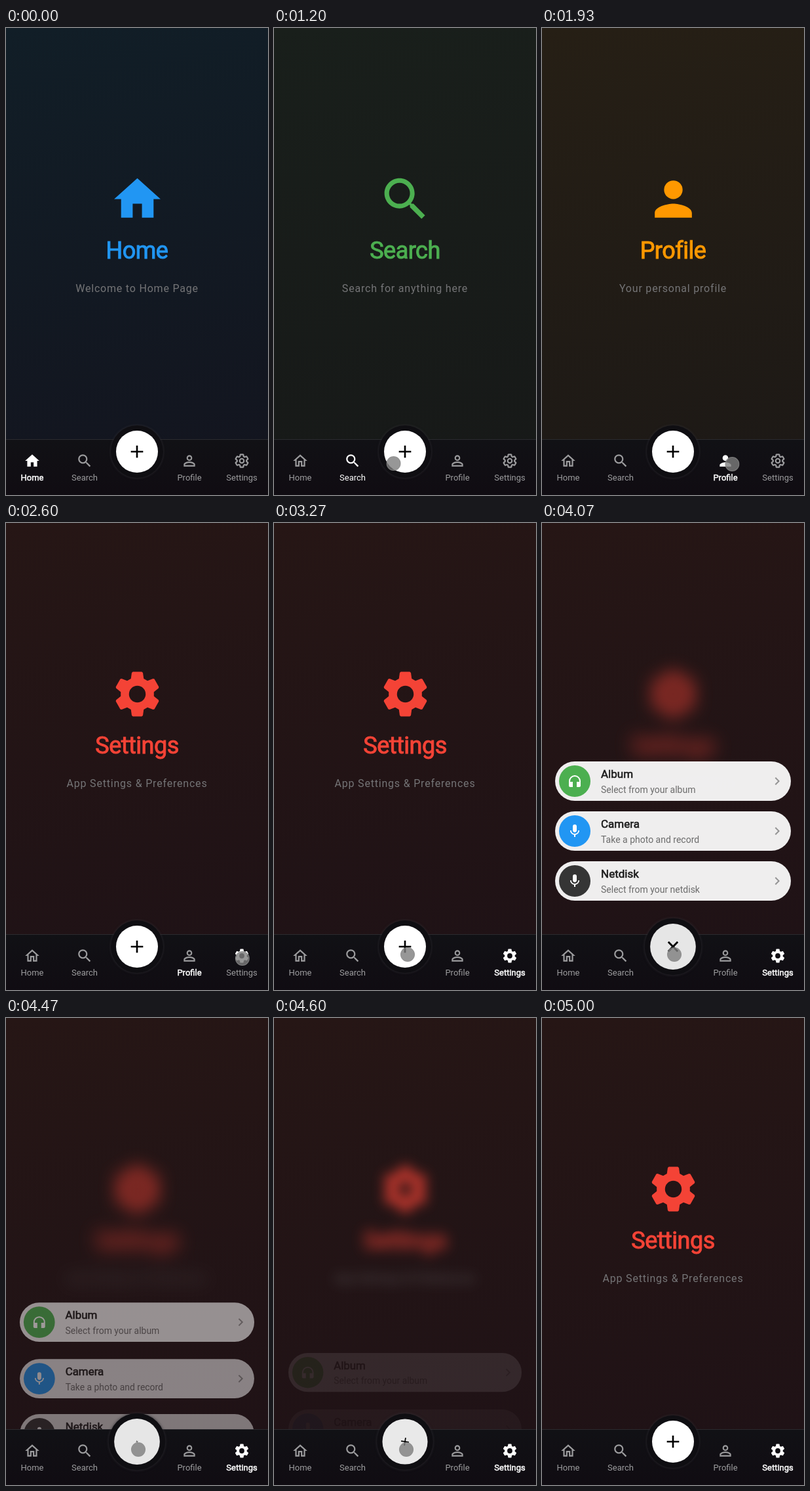
Write an HTML page that moves like this. It is 400 by 711 pixels and loops after 5.4 s.

```html
<!DOCTYPE html>
<html lang="en">
<head>
<meta charset="utf-8">
<title>Tab bar</title>
<style>
  html, body { margin: 0; width: 100%; height: 100%; overflow: hidden; background: #111; }
  #stage { position: relative; width: 400px; height: 711px; overflow: hidden; font-family: Roboto, "Open Sans", sans-serif; }
  #stage div, #stage svg { position: absolute; }
  .fill { inset: 0; }
  .line { white-space: nowrap; line-height: 20px; height: 20px; }
  .mid { left: 0; width: 100%; text-align: center; }
  .title { top: 329px; font-size: 36px; letter-spacing: -.5px; -webkit-text-stroke: 1px currentColor; }
  .sub { top: 386.5px; font-size: 16px; letter-spacing: .8px; color: #747476; }
  .card { left: 20px; width: 360px; height: 60px; border-radius: 30px; background: rgba(255,255,255,.93); }
  .disc { left: 6px; top: 6px; width: 48px; height: 48px; border-radius: 50%; }
  .name { left: 70px; top: 8.5px; font-size: 17px; color: #1c1c1c; -webkit-text-stroke: .6px currentColor; }
  .note { left: 70px; top: 33px; font-size: 14px; color: #6c6c6c; }
  #nav { left: 0; top: 626px; width: 400px; height: 85px; background: linear-gradient(#111115, #100c12); }
  #nav::before { content: ""; position: absolute; top: 0; width: 100%; height: 1px; background: rgba(255,255,255,.11); }
  .tab { width: 80px; height: 85px; top: 0; }
  .tab .line { top: 49px; font-size: 13px; }
  #halo { left: 160px; top: 605px; width: 80px; height: 80px; border-radius: 50%; background: #0f0e12; box-shadow: 0 0 3px 1px rgba(50,48,52,.55); }
  #skirt { left: 150px; top: 645px; width: 100px; height: 48px; background: radial-gradient(ellipse at 50% 0, #0f0e12 75%, transparent 100%); }
  #fab { left: 168px; top: 613px; width: 64px; height: 64px; border-radius: 50%; }
  #touch { left: -11px; top: -11px; width: 20px; height: 20px; border-radius: 50%; background: rgba(125,125,125,.8); border: 1px solid rgba(140,140,140,.6); }
</style>
</head>
<body>
<div id="stage"></div>
<script>
const LOOP = 5400;
const stage = document.getElementById('stage');

function add(parent, cls, text) {
  const el = document.createElement('div');
  el.className = cls;
  if (text) el.textContent = text;
  parent.append(el);
  return el;
}

function icon(parent, shape, size, cx, cy, color) {
  const box = document.createElementNS('http://www.w3.org/2000/svg', 'svg');
  box.setAttribute('viewBox', '0 0 24 24');
  box.innerHTML = shape;
  Object.assign(box.style, {
    width: size + 'px', height: size + 'px', overflow: 'visible',
    left: cx - size / 2 + 'px', top: cy - size / 2 + 'px', fill: color, color
  });
  parent.append(box);
  return box;
}

// One tooth, turned six times about the centre.
function gearPath(k) {
  const tooth = [[-2.76, -6.65], [-2.4, -9.19], [-1.92, -9.6], [1.92, -9.6], [2.4, -9.19], [2.76, -6.65]];
  const pts = [];
  for (let i = 0; i < 6; i++) {
    const c = Math.cos(i * Math.PI / 3), s = Math.sin(i * Math.PI / 3);
    for (const [x, y] of tooth) pts.push(`${(12 + k * (x * c - y * s)).toFixed(2)} ${(12 + k * (x * s + y * c)).toFixed(2)}`);
  }
  return 'M' + pts.join('L') + 'z';
}

const path = d => `<path fill-rule="evenodd" d="${d}"/>`;
const search = path('M15.5 14h-.79l-.28-.27C15.41 12.59 16 11.11 16 9.5 16 5.91 13.09 3 9.5 3S3 5.91 3 9.5 5.91 16 9.5 16c1.61 0 3.09-.59 4.23-1.57l.27.28v.79l5 4.99L20.49 19l-4.99-5zm-6 0a4.5 4.5 0 1 1 0-9 4.5 4.5 0 0 1 0 9z');
const shapes = {
  home: path('M10 20v-6h4v6h5v-8h3L12 3 2 12h3v8z'),
  homeLine: path('M12 5.69l5 4.5V18h-2v-6H9v6H7v-7.81zM12 3L2 12h3v8h6v-6h2v6h6v-8h3z'),
  person: path('M12 12a4 4 0 1 0 0-8 4 4 0 0 0 0 8zm0 2c-2.67 0-8 1.34-8 4v2h16v-2c0-2.66-5.33-4-8-4z'),
  personLine: path('M12 5.9a2.1 2.1 0 1 1 0 4.2 2.1 2.1 0 0 1 0-4.2m0 9c2.97 0 6.1 1.46 6.1 2.1v1.1H5.9V17c0-.64 3.13-2.1 6.1-2.1M12 4a4 4 0 1 0 0 8 4 4 0 0 0 0-8zm0 9c-2.67 0-8 1.34-8 4v3h16v-3c0-2.66-5.33-4-8-4z'),
  gear: path(gearPath(1) + 'M12 8.4a3.6 3.6 0 1 0 0 7.2 3.6 3.6 0 0 0 0-7.2z'),
  gearLine: `<g fill="none" stroke="currentColor" stroke-width="2"><path stroke-linejoin="round" d="${gearPath(.93)}"/><circle cx="12" cy="12" r="3"/></g>`,
  headphones: path('M12 3a9 9 0 0 0-9 9v7c0 1.1.9 2 2 2h4v-8H5v-1a7 7 0 0 1 14 0v1h-4v8h4c1.1 0 2-.9 2-2v-7a9 9 0 0 0-9-9z'),
  mic: path('M12 14c1.66 0 3-1.34 3-3V5a3 3 0 0 0-6 0v6c0 1.66 1.34 3 3 3zm5.3-3c0 3-2.54 5.1-5.3 5.1S6.7 14 6.7 11H5c0 3.41 2.72 6.23 6 6.72V21h2v-3.28c3.28-.48 6-3.3 6-6.72z'),
  chevron: path('M10 6L8.59 7.41 13.17 12l-4.58 4.59L10 18l6-6z'),
  plus: path('M19 13h-6v6h-2v-6H5v-2h6V5h2v6h6z')
};

// span: page change; label: time at which the tab's text lights up
const tabs = [
  { text: 'Home', sub: 'Welcome to Home Page', color: '#2196f3', bg: ['#111e27', '#13151f'], on: shapes.home, off: shapes.homeLine, x: 40, span: [-2, -1], label: 0, bold: .5 },
  { text: 'Search', sub: 'Search for anything here', color: '#4caf50', bg: ['#191f1b', '#171918'], on: search, off: search, x: 120, span: [600, 900], label: 800, bold: 0 },
  { text: 'Profile', sub: 'Your personal profile', color: '#ff9800', bg: ['#261f15', '#1d1916'], on: shapes.person, off: shapes.personLine, x: 280, span: [1400, 1600], label: 1640, bold: .5 },
  { text: 'Settings', sub: 'App Settings & Preferences', color: '#f44336', bg: ['#261615', '#1f1216'], on: shapes.gear, off: shapes.gearLine, x: 360, span: [2150, 2400], label: 2640, bold: .5 }
];

const cards = [
  { name: 'Album', note: 'Select from your album', color: '#4caf50', shape: shapes.headphones, y: 393, open: 3620, close: 4352 },
  { name: 'Camera', note: 'Take a photo and record', color: '#2196f3', shape: shapes.mic, y: 469, open: 3550, close: 4335 },
  { name: 'Netdisk', note: 'Select from your netdisk', color: '#353535', shape: shapes.mic, y: 545, open: 3422, close: 4322 }
];

const backdrop = add(stage, 'fill');
const pages = add(stage, 'fill');
const menu = add(stage, 'fill');
const nav = add(stage, '');
nav.id = 'nav';

for (const tab of tabs) {
  tab.back = add(backdrop, 'fill');
  tab.back.style.background = `linear-gradient(170deg, ${tab.bg.join(', ')} 92%)`;

  tab.page = add(pages, 'fill');
  tab.page.style.transformOrigin = '200px 320px';
  icon(tab.page, tab.on, 85, 200, 260, tab.color);
  add(tab.page, 'line mid title', tab.text).style.color = tab.color;
  add(tab.page, 'line mid sub', tab.sub);

  const cell = add(nav, 'tab');
  cell.style.left = tab.x - 40 + 'px';
  tab.lit = icon(cell, tab.on, 26, 40, 33, '#fff');
  tab.dim = icon(cell, tab.off, 26, 40, 33, '#9c9c9e');
  tab.caption = add(cell, 'line mid', tab.text);
}

for (const card of cards) {
  const el = card.el = add(menu, 'card');
  el.style.top = card.y - 30 + 'px';
  const disc = add(el, 'disc');
  disc.style.background = card.color;
  icon(disc, card.shape, 24, 24, 24, '#fff');
  add(el, 'line name', card.name);
  add(el, 'line note', card.note);
  icon(el, shapes.chevron, 24, 339, 30, '#949494');
}

const part = id => { const el = add(stage, ''); el.id = id; return el; };
const halo = part('halo');
const skirt = part('skirt');
skirt.style.display = 'none';
const fab = part('fab');
const plus = icon(fab, shapes.plus, 32, 32, 32, '#000');
const cross = icon(fab, shapes.plus, 32, 32, 32, '#000');
const touch = part('touch');

const ramp = (t, a, b) => Math.min(1, Math.max(0, (t - a) / (b - a)));
const smooth = p => p * p * (3 - 2 * p);

const route = [
  [530, 122, 661], [1070, 120, 663], [1405, 280, 663], [1660, 280, 663], [1730, 286, 664],
  [1930, 290, 664], [2130, 360, 663], [2650, 361, 663], [3130, 204, 657], [3400, 204, 657], [3700, 202, 657], [LOOP, 202, 657]
];

function along(t) {
  let i = 1;
  while (i < route.length - 1 && t > route[i][0]) i++;
  const [a, b] = [route[i - 1], route[i]];
  const p = ramp(t, a[0], b[0]);
  return [a[1] + (b[1] - a[1]) * p, a[2] + (b[2] - a[2]) * p];
}

function draw(t) {
  const shown = tabs.map(tab => smooth(ramp(t, ...tab.span)));
  const active = shown.filter(p => p > .25).length - 1;
  const named = tabs.filter(tab => t >= tab.label).length - 1;

  tabs.forEach((tab, i) => {
    const seen = shown[i] * (1 - (shown[i + 1] || 0));
    tab.back.style.opacity = shown[i];
    tab.page.style.opacity = seen;
    tab.page.style.transform = `scale(${.9 + .1 * shown[i]})`;
    tab.lit.style.opacity = i === active ? 1 : 0;
    tab.dim.style.opacity = i === active ? 0 : 1;
    tab.caption.style.color = i === named ? '#fff' : '#9c9c9e';
    tab.caption.style.webkitTextStroke = (i === named ? tab.bold : 0) + 'px currentColor';
  });

  const blur = ramp(t, 3400, 3800) * (1 - smooth(ramp(t, 4420, 4960)));
  pages.style.filter = blur ? `blur(${14 * blur}px)` : 'none';
  pages.style.opacity = 1 - .3 * blur * blur;

  for (const { el, open, close } of cards) {
    const v = ramp(t, open, 3800);
    const out = ramp(t, close, close + 275);
    el.style.opacity = v * (1 - out);
    el.style.transform = `translateY(${50 * (1 - v) + 162 * out}px) scale(${(.8 + .2 * v) * (1 - .012 * out)})`;
  }

  const grown = smooth(ramp(t, 3330, 3660)) * (1 - smooth(ramp(t, 4530, 4870)));
  const grey = 255 - 25 * grown;
  halo.style.transform = `scale(${1 + .08 * grown})`;
  fab.style.transform = `scale(${1 + .09 * grown})`;
  fab.style.background = `rgb(${grey},${grey},${grey})`;

  // The plus shrinks away before the cross grows, and back again.
  const toCross = ramp(t, 3330, 3680), toPlus = ramp(t, 4330, 4670);
  const turn = toCross - toPlus;
  plus.style.transform = `rotate(${45 * turn}deg) scale(${Math.max(0, 1 - 2 * turn)})`;
  cross.style.transform = `rotate(${45 + 45 * toPlus - 45 * (1 - toCross)}deg) scale(${Math.max(0, 2 * turn - 1)})`;

  const [x, y] = along(t);
  touch.style.transform = `translate(${x}px, ${y}px)`;
  touch.style.opacity = ramp(t, 520, 600) * (1 - ramp(t, 4800, 4930));
}

const start = performance.now();
function tick() {
  draw((performance.now() - start) % LOOP);
  requestAnimationFrame(tick);
}
tick();
</script>
</body>
</html>
```
